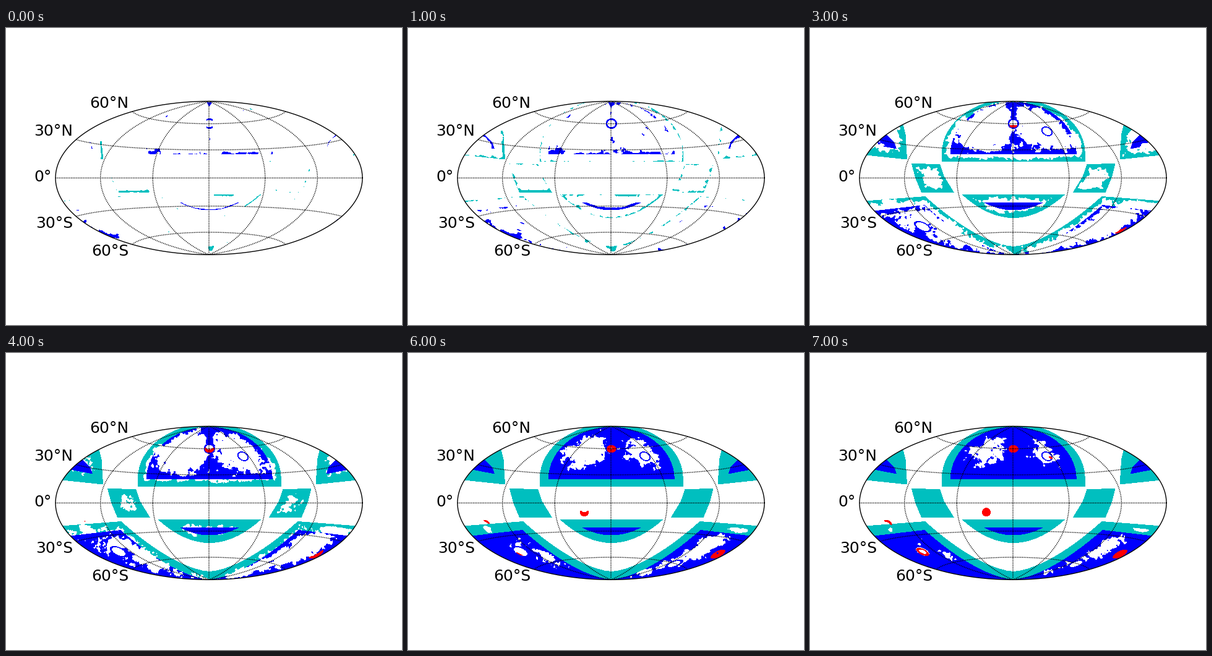
Write a matplotlib script that moves like this. It is 640 by 480 pixels and loops after 8 s.

```python
import numpy as np
import matplotlib.pyplot as plt
from matplotlib.animation import FuncAnimation
from matplotlib.path import Path

W, H, STEPS = 640, 480, 8
TOP, BOTTOM = 112, 372
CX, CY, RX, RY = 328, 242.4, 248, 124
MID = 328.8
CYAN, BLUE, RED = (0, 191, 191), (0, 0, 255), (255, 0, 0)

Y, X = np.mgrid[TOP:BOTTOM, :W] + 0.5
FOLD = MID - np.abs(X - MID)  # the covered areas are symmetric
GLOBE = ((X - CX) / RX) ** 2 + ((Y - CY) / RY) ** 2 <= 1


def fractal(seed):
    """Smooth fractal noise with zero mean and unit deviation."""
    f = np.hypot(np.fft.fftfreq(X.shape[0])[:, None], np.fft.fftfreq(W)[None])
    white = np.fft.fft2(np.random.default_rng(seed).normal(size=X.shape))
    n = np.fft.ifft2(white * (f + 0.03) ** -1.4 * np.exp(-(f / 0.28) ** 2)).real
    return (n - n.mean()) / n.std()


NOISE = fractal(11)


def dist(x, y, line):
    """Distance of each point to a polyline."""
    best = np.full(x.shape, 1e9)
    for (x0, y0), (x1, y1) in zip(line[:-1], line[1:]):
        dx, dy = x1 - x0, y1 - y0
        s = np.clip(((x - x0) * dx + (y - y0) * dy) / (dx * dx + dy * dy), 0, 1)
        best = np.minimum(best, np.hypot(x - x0 - s * dx, y - y0 - s * dy))
    return best


def ellipse_xy(x, y, rx, ry, deg=0):
    """Coordinates in units of a turned ellipse."""
    a = np.radians(deg)
    dx, dy = X - x, Y - y
    return ((dx * np.cos(a) + dy * np.sin(a)) / rx,
            (dy * np.cos(a) - dx * np.sin(a)) / ry)


def arc(cx, cy, rx, ry, start, stop, n=16):
    t = np.radians(np.linspace(start, stop, n))
    return list(zip(cx + rx * np.cos(t), cy - ry * np.sin(t)))


def bowl(half, top, depth, n=10):
    u = np.linspace(1, 0, n)
    return list(zip(MID - half * u, top + depth * (1 - u ** 2)))


def slope(x, top, bottom, n=14):
    u = np.linspace(0, 1, n)
    return list(zip(x + (MID - x) * u, bottom - (bottom - top) * (1 - u) ** 1.58))


class Layer:
    """Holds the time at which each pixel becomes covered."""

    def __init__(self):
        self.time = np.full(X.shape, 99.0)
        self.mask = np.zeros(X.shape, bool)

    def area(self, edge, rest, start, span, reach, rough):
        """Fill inwards from an edge, slower with depth; rest closes the shape."""
        grid = np.column_stack([FOLD.ravel(), Y.ravel()])
        inside = Path(edge + rest).contains_points(grid).reshape(X.shape) & GLOBE
        depth = dist(FOLD, Y, edge)
        t = start + span * (1 - np.exp(-depth / reach)) + rough * NOISE
        self.time[inside] = t[inside]
        self.mask |= inside

    def delay(self, amount, x, y, rx, ry, deg=0):
        u, v = ellipse_xy(x, y, rx, ry, deg)
        self.time += amount * np.exp(-u * u - v * v)

    def streak(self, *line):
        self.time -= 2.5 * np.exp(-(dist(X, Y, line) / 2) ** 2)

    def crater(self, x, y, rx, ry, deg, start, rim=1.6):
        u, v = ellipse_xy(x, y, rx, ry, deg)
        d = np.hypot(u, v)
        edge = start + 1.8 * np.abs(u)
        self.time = np.where(d <= 1, np.minimum(self.time, edge), self.time)
        self.time[d < 1 - rim / abs(ry)] = 99

    def disc(self, x, y, rx, ry, deg, start, sweep, core):
        """Sweep round the rim from the lowest point, then fill the core."""
        u, v = ellipse_xy(x, y, rx, ry, deg)
        d = np.hypot(u, v)
        t = start + sweep * np.abs(np.arctan2(u, v)) / np.pi + core * np.maximum(0, 0.7 - d)
        self.time[d <= 1] = t[d <= 1]

    def covered(self, k):
        return self.time <= k


end = MID + 1

blue = Layer()
blue.area([(end, 203.5)] + arc(MID, 203.5, 102, 84, 180, 90) + [(end, 119)], [],
          1.5, 3.2, 9, 1)
blue.area(bowl(48, 282, 12.5), [(end, 294.5), (end, 282)], -0.6, 3.5, 6, 0.15)
blue.area([(140, 195.5), (136, 184), (119, 167)], [(70, 165), (70, 182)],
          -0.2, 4, 10, 0.25)
blue.area([(95, 296.5)] + slope(185, 286, 366) + arc(CX, CY, RX, RY, 270, 206),
          [], 1.3, 3.2, 8, 1)
blue.delay(-1.2, MID, 204, 110, 12)
blue.delay(-4, MID, 130, 7, 30)
blue.delay(-2.6, 330, 182, 18, 15)
blue.delay(-2, 238, 194, 12, 10)
blue.delay(-2, 312, 129, 14, 4, -30)
blue.delay(-1, 135, 312, 32, 14, 20)
blue.delay(4, 284, 155, 42, 24, -20)
blue.delay(4, 386, 165, 34, 19, 32)
blue.delay(4, 242, 332, 55, 12, 25)
blue.delay(4, 400, 345, 75, 11, -20)
blue.delay(4, 485, 308, 42, 13, -35)
blue.streak((351, 203), (406, 202))
blue.streak((152, 328), (214, 350))
blue.crater(MID, 154.5, 9.2, 8.4, 0, -1, 2.4)
blue.crater(383, 167, 10, 7, 30, 0.6)
blue.crater(182, 321, 15, 7, 25, 0.6)
blue.crater(430, 341, 16, 5, -20, 3.5)

cyan = Layer()
cyan.area([(end, 216), (213, 216)] + arc(MID, 203, 116, 89, 180, 90), [],
          1, 6, 14, 0.5)
cyan.area([(end, 269)] + bowl(83.5, 269, 38), [], 0.9, 5, 13, 0.5)
cyan.area([(70, 203.4), (157, 212.5), (154.5, 172), (149, 150)], [(70, 150)],
          0.9, 5, 20, 0.5)
block = [(164, 219), (210, 220), (217, 240), (233, 266), (180, 266), (170, 242)]
cyan.area(block + block[:1], [], 1, 5, 15, 0.6)
cyan.area([(70, 281)] + slope(186, 272, 353), [(end, 400), (70, 400)],
          1.1, 4, 9, 0.7)
cyan.delay(-3, MID, 358, 9, 6)
cyan.delay(5, 126, 282, 9, 6, 40)
cyan.delay(5, 537, 286, 18, 4, 5)
cyan.streak((185, 264), (231, 264))
cyan.streak((337, 270), (365, 270))
cyan.streak((388, 288), (412, 271))
cyan.streak((153, 185), (156, 211))
cyan.streak((430, 262), (437, 262))

red = Layer()
red.disc(MID, 155, 7.8, 6.2, 0, 1.7, 3.7, 2)
red.disc(285, 257.2, 7, 7, 0, 4.85, 1.8, 0.4)
red.disc(501, 325, 13, 4.8, -28, 1.5, 4.4, 1.5)
red.disc(182, 321.5, 11.5, 4.8, 25, 5.8, 1.1, 4)
red.disc(124, 278, 9, -8, 30, 3.8, 10, 20)
red.disc(389, 169, 3, 2, 30, 6.5, 0.4, 0)


def picture(k):
    img = np.full(X.shape + (3,), 255, np.uint8)
    img[cyan.mask & ~blue.mask & cyan.covered(k)] = CYAN
    img[blue.mask & blue.covered(k)] = BLUE
    img[GLOBE & red.covered(k)] = RED
    return img


def hammer(lon, lat):
    lon, lat = np.radians(lon) / 2, np.radians(lat)
    s = np.sqrt(1 + np.cos(lat) * np.cos(lon))
    return CX + RX * np.cos(lat) * np.sin(lon) / s, CY - RY * np.sin(lat) / s


fig = plt.figure(figsize=(W / 100, H / 100), dpi=100, facecolor="white")
ax = fig.add_axes([0, 0, 1, 1])
ax.axis("off")
sky = ax.imshow(picture(0), extent=(0, W, BOTTOM, TOP), interpolation="nearest",
                aspect="auto")
ax.set(xlim=(0, W), ylim=(H, 0))

dotted = dict(color="black", lw=1, ls=(0, (1, 1)))
for lat in range(-60, 61, 30):
    ax.plot(*hammer(np.linspace(-180, 180, 2001), lat), **dotted)
    x, y = hammer(-180, lat)
    side, va = {1: ("N", "bottom"), 0: ("", "center"), -1: ("S", "top")}[np.sign(lat)]
    ax.text(np.floor(x - 5.1), np.floor(y) - (lat >= 0), f"{abs(lat)}°{side}",
            size=18, family="DejaVu Sans", ha="right", va=va)
for lon in range(-120, 121, 60):
    ax.plot(*hammer(lon, np.linspace(-90, 90, 2001)), **dotted)
turn = np.linspace(0, 2 * np.pi, 400)
ax.plot(CX + RX * np.cos(turn), CY + RY * np.sin(turn), color="black", lw=1)


def update(k):
    sky.set_data(picture(k))
    return (sky,)


anim = FuncAnimation(fig, update, frames=STEPS, interval=1000, repeat=True,
                     repeat_delay=0, blit=False)
plt.show()
```
